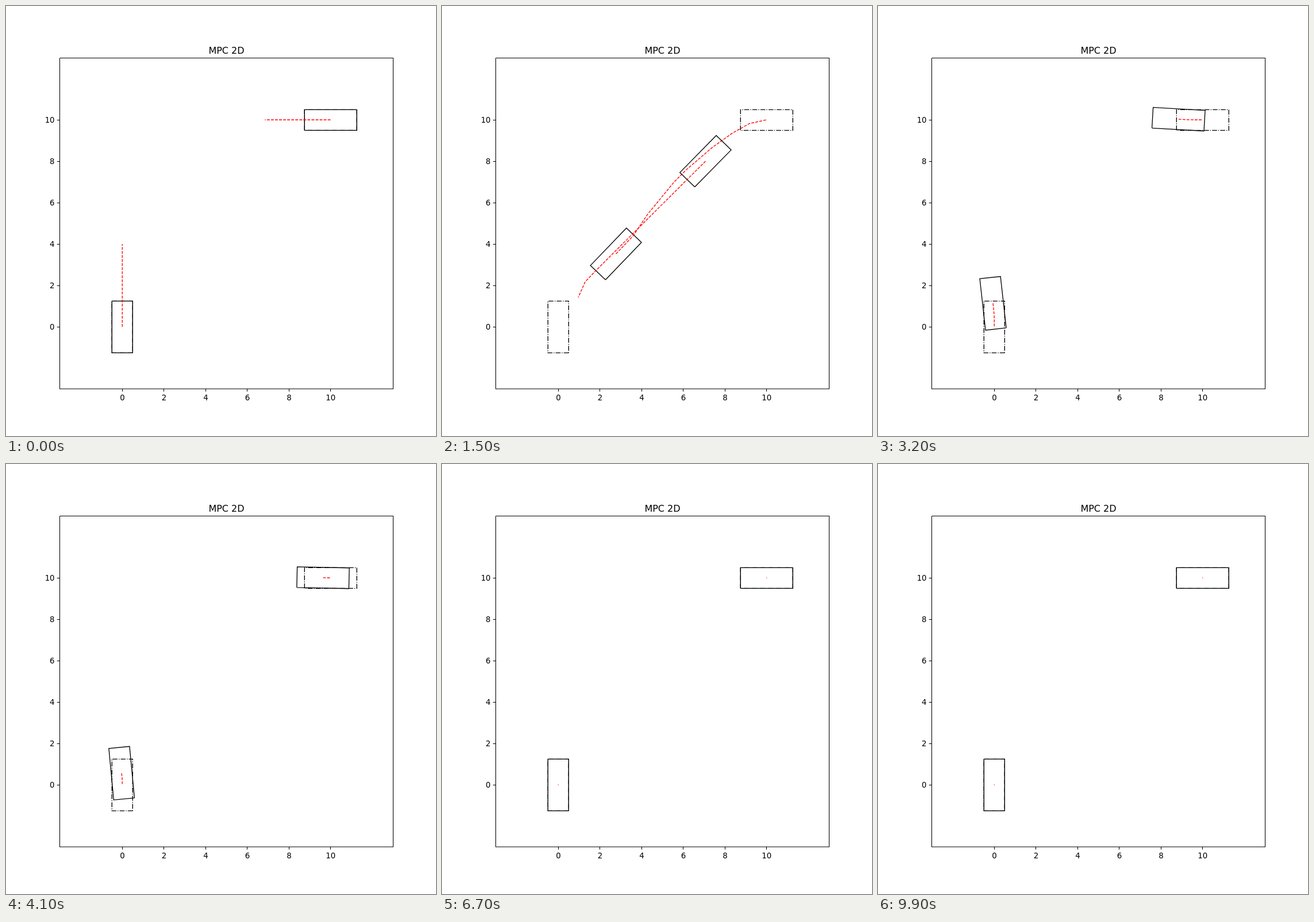
Recreate the animation shown at these times as an HTML page with a canvas. Size 748x748 px, loop 10000 ms.

```html
<!DOCTYPE html>
<html>
<head>
<meta charset="utf-8">
<title>MPC 2D</title>
<style>
html, body { margin: 0; width: 100%; height: 100%; overflow: hidden; background: #fff; }
canvas { display: block; }
</style>
</head>
<body>
<canvas id="stage" width="748" height="748"></canvas>
<script>
const ctx = document.getElementById('stage').getContext('2d');
const LOOP = 10000, STEP = 100;
const TIMES = [0, 5, 11, 15, 20, 25, 29, 33, 41, 44, 55, 70];

// Poses are x, y, heading in degrees, one per entry of TIMES.
const cars = [
  { dir: 1, firstEnd: [0, 4],
    poses: [[0, 0, 90], [0, .05, 65], [1, .6, 58], [2.77, 3.52, 46.3], [4.15, 5.95, 55], [5.9, 8.23, 60],
      [7.7, 9.86, 16], [9.08, 10.02, -6], [9.64, 10.005, -1.2], [9.82, 10, -.4], [9.96, 10, 0], [10, 10, 0]],
    route: [[3.6, 4.4], [4.3, 5.45], [5.54, 6.97], [6.14, 7.58], [7.4, 8.67], [8.35, 9.35], [9.18, 9.82], [10, 10]] },
  { dir: -1, firstEnd: [6.85, 10],
    poses: [[10, 10, 0], [9.98, 10, 20], [9.25, 9.35, 30], [7.07, 8, 45.7], [5.15, 6.1, 41], [2.715, 4.69, 22.9],
      [.35, 2.75, 72], [-.08, .82, 100], [-.03, .56, 95.4], [0, .22, 92], [0, .01, 90], [0, 0, 90]],
    route: [[3.6, 4.52], [1.76, 2.67], [1.29, 2.17], [.96, 1.42]] }
];

const X = x => 202.25 + 36.23 * x;
const Y = y => 558 - 36 * y;
const mix = (a, b, k) => a + (b - a) * k;
const rad = deg => deg * Math.PI / 180;

function poseAt(poses, t) {
  const last = TIMES.length - 1;
  if (t >= TIMES[last]) return poses[last];
  const i = TIMES.findIndex(v => v > t) - 1;
  const span = TIMES[i + 1] - TIMES[i], u = (t - TIMES[i]) / span;
  const slope = (j, c) => j === 0 || j === last ? 0 :
    (poses[j + 1][c] - poses[j - 1][c]) / (TIMES[j + 1] - TIMES[j - 1]);
  return poses[i].map((p, c) => {
    const q = poses[i + 1][c];
    return mix(p, q, u * u * (3 - 2 * u)) +
      span * u * (1 - u) * (slope(i, c) * (1 - u) - slope(i + 1, c) * u);
  });
}

function trace(points, color, dash, width = 1.33) {
  ctx.beginPath();
  points.forEach(([x, y]) => ctx.lineTo(x, y));
  ctx.setLineDash(dash);
  ctx.strokeStyle = color;
  ctx.lineWidth = width;
  ctx.stroke();
}

function box([x, y, heading], dash = []) {
  const c = Math.cos(rad(heading)), s = Math.sin(rad(heading));
  const square = Math.abs(c * s) < .001;
  const snap = v => square ? Math.round(v - .3) + .3 : v;
  const corners = [[-1, -1], [-1, 1], [1, 1], [1, -1], [-1, -1]].map(([a, b]) => [
    snap(X(x + 1.25 * a * c - .5 * b * s)),
    snap(Y(y + 1.25 * a * s + .5 * b * c))
  ]);
  trace(corners, '#000', dash);
}

function prediction(car, pose, t) {
  const [x, y, heading] = pose;
  const goal = car.poses[TIMES.length - 1];
  let points;
  if (t >= 12 && t < 19) {
    const ahead = ([a, b]) => car.dir * (a + b - x - y) > .4;
    points = [[x, y], ...car.route.filter(ahead)];
  } else {
    const k = Math.min(1, t / 11);
    const end = [0, 1].map(c => mix(car.firstEnd[c], goal[c], k));
    const endHeading = mix(car.poses[0][2], goal[2], k);
    const reach = .48 * car.dir * Math.hypot(end[0] - x, end[1] - y);
    const wave = [Math.cos, Math.sin];
    points = Array.from({ length: 21 }, (_, i) => {
      const u = i / 20, v = 1 - u;
      return [0, 1].map(c => {
        const a = pose[c], b = end[c];
        const p = a + reach * wave[c](rad(heading));
        const q = b - reach * wave[c](rad(endHeading));
        return v * v * v * a + 3 * v * v * u * p + 3 * v * u * u * q + u * u * u * b;
      });
    });
  }
  trace(points.map(([a, b]) => [X(a), Y(b)]), 'red', [4.92, 2.13]);
  if (t >= 50) {
    ctx.fillStyle = 'red';
    ctx.fillRect(X(goal[0]) - .6, Y(goal[1]) - .6, 1.2, 1.2);
  }
}

function label(text, x, y, size, align) {
  ctx.font = `${size}px "DejaVu Sans", sans-serif`;
  ctx.textAlign = align;
  ctx.fillStyle = '#000';
  ctx.fillText(text, x, y);
}

function axes() {
  const spine = points => trace(points, '#000', [], 1.07);
  spine([[93.5, 90.5], [673.5, 90.5], [673.5, 666], [93.5, 666], [93.5, 90.5]]);
  for (let v = 0; v <= 10; v += 2) {
    const x = Math.floor(X(v)) + .5, y = Y(v) + .5;
    spine([[x, 666], [x, 670.7]]);
    spine([[93.5, y], [88.8, y]]);
    label(v, X(v) + .3, 686, 13.33, 'center');
    label(v, 84.6, y + 4.7, 13.33, 'right');
  }
  label('MPC 2D', 383.5, 82.5, 16, 'center');
}

function draw(now) {
  const t = Math.floor(now % LOOP / STEP);
  ctx.fillStyle = '#fff';
  ctx.fillRect(0, 0, 748, 748);
  axes();
  for (const car of cars) {
    const pose = poseAt(car.poses, t);
    box(car.poses[0], [8.53, 2.13, 1.33, 2.13]);
    box(pose);
    prediction(car, pose, t);
  }
  requestAnimationFrame(draw);
}

const start = performance.now();
requestAnimationFrame(() => draw(0));
draw = (render => () => render(performance.now() - start))(draw);
</script>
</body>
</html>
```
